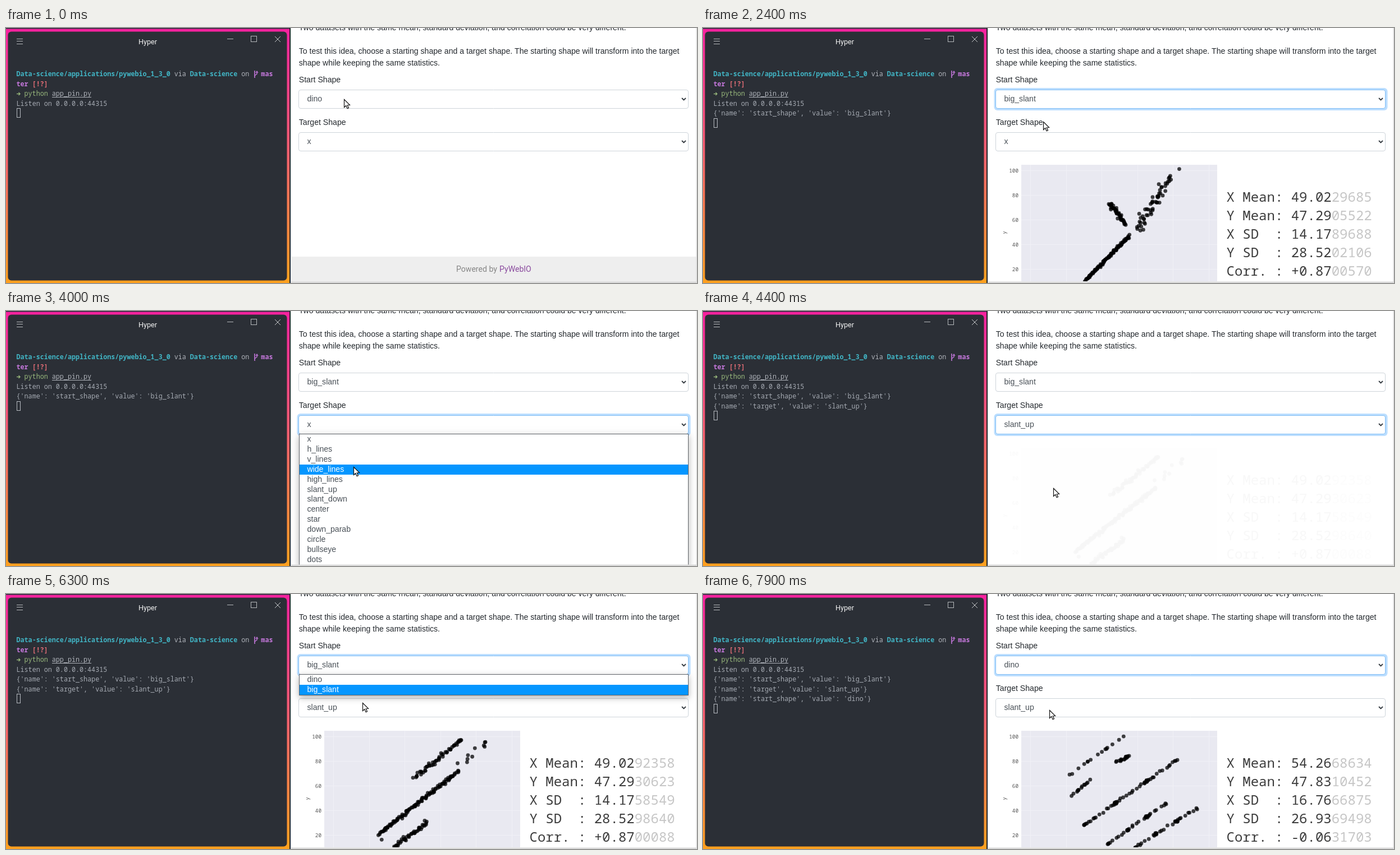
An HTML page with a canvas for the animation above (8 s loop, 1231 by 455 pixels).

```html
<!DOCTYPE html>
<html lang="en">
<head>
<meta charset="utf-8">
<title>Pin widgets demo</title>
<style>
html, body { margin: 0; width: 100%; height: 100%; overflow: hidden; background: #fff; }
canvas { display: block; width: 1231px; height: 455px; }
</style>
</head>
<body>
<canvas id="stage" width="1231" height="455"></canvas>
<script>
const W = 1231, H = 455, LOOP = 8000, STEP = 100, GLIDE = 250;
const ctx = document.getElementById('stage').getContext('2d');
const SANS = '14.08px "Liberation Sans", Arial, sans-serif';
const ROBOTO = 'Roboto, sans-serif';
const MONO = '"Noto Sans Mono", monospace';
const CELL = 7.03, ROW = 17.55;
const STARTS = ['dino', 'big_slant'];
const TARGETS = ['x', 'h_lines', 'v_lines', 'wide_lines', 'high_lines', 'slant_up',
  'slant_down', 'center', 'star', 'down_parab', 'circle', 'bullseye', 'dots'];

// Where the pointer comes to rest: arrival time, x, y
const STOPS = [
  [0, 602, 127], [200, 599, 128], [1100, 619, 179], [1500, 604, 163], [1900, 606, 167],
  [2800, 616, 183], [3300, 610, 207], [4100, 624, 316], [5100, 645, 260], [5300, 640, 172],
  [5700, 635, 125], [6300, 635, 194], [6700, 615, 150], [7900, 617, 207]
];

// Noisy streaks of dots: x1, y1, x2, y2, count, spread
const SLANT_TO_X = [
  [680, 452, 760, 370, 95, 2.4], [724, 311, 753, 350, 46, 3.4], [774, 362, 832, 262, 56, 9]
];
const SLANT_UP = [
  [663, 430, 806, 315, 112, 3.6], [690, 453, 752, 407, 42, 3.8],
  [728, 328, 812, 258, 52, 4], [812, 304, 858, 262, 10, 7]
];
const DINO_UP = [
  [653, 322, 747, 256, 15, 1], [658, 359, 690, 332, 13, 2], [736, 300, 760, 289, 15, 2.4],
  [680, 412, 838, 300, 60, 2.2], [722, 445, 822, 376, 36, 2.2], [770, 452, 877, 384, 36, 2.2]
];

// Each pick closes the list, logs a line and fades a new chart in
const PICKS = [
  { at: 1700, log: "{'name': 'start_shape', 'value': 'big_slant'}",
    chart: makeChart(SLANT_TO_X, 0, ['49.0229685', '47.2905522', '14.1789688', '28.5202106', '+0.8700570']) },
  { at: 4300, log: "{'name': 'target', 'value': 'slant_up'}",
    chart: makeChart(SLANT_UP, 0, ['49.0292358', '47.2930623', '14.1758549', '28.5298640', '+0.8700088']) },
  { at: 6900, log: "{'name': 'start_shape', 'value': 'dino'}",
    chart: makeChart(DINO_UP, 1, ['54.2668634', '47.8310452', '16.7666875', '26.9369498', '-0.0631703']) }
];

function text(g, str, x, y, color, font, align = 'left') {
  g.font = font;
  g.fillStyle = color;
  g.textAlign = align;
  g.fillText(str, x, Math.round(y));
}

function box(g, x, y, w, h, color) {
  g.fillStyle = color;
  g.fillRect(x, y, w, h);
}

function line(points, color, width = 1) {
  ctx.beginPath();
  points.forEach(([x, y]) => ctx.lineTo(x, y));
  ctx.strokeStyle = color;
  ctx.lineWidth = width;
  ctx.stroke();
}

function random(seed) {
  return () => {
    seed = (seed * 16807) % 2147483647;
    return seed / 2147483647;
  };
}

// Dots along each streak; clump gathers them in bunches, a few stray further off
function scatter(g, streaks, clump) {
  const rnd = random(40503);
  g.fillStyle = 'rgba(0,0,0,.74)';
  for (const [x1, y1, x2, y2, n, spread] of streaks) {
    for (let i = 0; i < n; i++) {
      let p = (i + rnd()) / n;
      p -= clump * Math.sin(18 * p) / 18;
      const reach = spread * (rnd() < .1 ? 3 - clump : 1);
      const stray = () => (rnd() + rnd() - 1) * reach;
      g.beginPath();
      g.arc(x1 + (x2 - x1) * p + stray(), y1 + (y2 - y1) * p + stray(), 3.4, 0, 7);
      g.fill();
    }
  }
}

function makeChart(streaks, clump, stats) {
  const layer = document.createElement('canvas');
  layer.width = W;
  layer.height = H;
  const g = layer.getContext('2d');
  box(g, 521, 235, 695, 217, '#fff');
  box(g, 567, 244, 349, 208, '#e9e9f1');
  for (let x = 583; x < 916; x += 63.5) box(g, Math.round(x), 244, 1, 208, '#f0f0f6');
  for (let i = 0; i < 5; i++) {
    const y = 255 + i * 44;
    box(g, 567, y - 1, 349, 1, '#f0f0f6');
    text(g, String(100 - i * 20), 562, y + 3, '#555', '9.3px ' + MONO, 'right');
  }
  g.save();
  g.translate(540, 365);
  g.rotate(-Math.PI / 2);
  text(g, 'y', 0, 0, '#555', '9px ' + MONO, 'center');
  g.restore();

  g.save();
  g.beginPath();
  g.rect(567, 244, 349, 208);
  g.clip();
  scatter(g, streaks, clump);
  g.restore();

  ['X Mean: ', 'Y Mean: ', 'X SD  : ', 'Y SD  : ', 'Corr. : '].forEach((label, i) => {
    const y = 310 + i * 33, font = '300 24px ' + MONO;
    text(g, label + stats[i].slice(0, 5), 932.5, y, '#3c3c3c', font);
    text(g, stats[i].slice(5), 932.5 + 13 * 14.4, y, '#c6c6c6', font);
  });
  return layer;
}

function pointer(t) {
  const next = STOPS.findIndex(s => s[0] > t);
  const i = next < 0 ? STOPS.length - 1 : next;
  const [t1, x1, y1] = STOPS[i], [t0, x0, y0] = STOPS[i - 1];
  const start = Math.max(t0, t1 - GLIDE);
  const p = Math.min(1, Math.max(0, (t - start) / (t1 - start)));
  const e = p * p * (3 - 2 * p);
  return [Math.round(x0 + (x1 - x0) * e), Math.round(y0 + (y1 - y0) * e)];
}

function drawPointer([x, y]) {
  ctx.save();
  ctx.translate(x + .5, y + .5);
  ctx.beginPath();
  [[0, 0], [0, 14], [3.2, 11], [5.6, 16.3], [8, 15.2], [5.7, 10.2], [10, 10]]
    .forEach(([a, b]) => ctx.lineTo(a, b));
  ctx.closePath();
  ctx.fillStyle = '#fff';
  ctx.fill();
  ctx.strokeStyle = '#111';
  ctx.lineWidth = 1.2;
  ctx.stroke();
  ctx.restore();
}

function drawTerminal(logs) {
  const sky = ctx.createLinearGradient(0, 0, 0, H);
  sky.addColorStop(0, '#f7219f');
  sky.addColorStop(.5, '#f7606c');
  sky.addColorStop(1, '#ffa01e');
  box(ctx, 0, 0, 505, H, sky);
  box(ctx, 0, 0, 505, 1.5, '#23313a');
  box(ctx, 505, 0, 2, H, '#23282d');
  ctx.beginPath();
  ctx.roundRect(3.5, 6.5, 497, 444, 6);
  ctx.fillStyle = '#2b2f36';
  ctx.fill();

  for (const y of [19.5, 23.5, 28.5]) line([[19, y], [30, y]], '#b5b8bb');
  line([[394, 19.5], [405, 19.5]], '#b5b8bb');
  ctx.strokeRect(436.5, 14.5, 10, 10);
  line([[479, 15], [489, 25]], '#c8cacc');
  line([[489, 15], [479, 25]], '#c8cacc');
  text(ctx, 'Hyper', 252.5, 29, '#f2f2f2', '12.7px ' + ROBOTO, 'center');

  const put = (str, col, row, color, bold = '') =>
    text(ctx, str, 18.5 + col * CELL, 86 + row * ROW, color, bold + ' 11.72px ' + MONO);
  const teal = '#41b4c4', grey = '#b0b4bb', purple = '#c678dd', green = '#98b87c';
  put('Data-science/applications/pywebio_1_3_0', 0, 0, teal, 'bold');
  put('via', 40, 0, grey);
  put('Data-science', 44, 0, teal, 'bold');
  put('on', 57, 0, grey);
  line([[443, 76], [443, 89]], purple, 1.6);
  line([[443, 85], [447, 82], [447, 78]], purple, 1.4);
  line([[445, 80], [447, 77], [449, 80]], purple, 1.2);
  put('mas', 62, 0, purple, 'bold');
  put('ter', 0, 1, purple, 'bold');
  put('[!?]', 4, 1, '#e06c75', 'bold');
  line([[19, 117.5], [25, 117.5]], green, 1.4);
  line([[22.5, 115], [25, 117.5], [22.5, 120]], green, 1.4);
  put('python', 2, 2, green);
  put('app_pin.py', 9, 2, grey);
  line([[82, 123.5], [152, 123.5]], grey);
  put('Listen on 0.0.0.0:44315', 0, 3, '#a5aab2');
  logs.forEach((log, i) => put(log, 0, 4 + i, '#a5aab2'));
  ctx.strokeStyle = '#b8bcc2';
  ctx.lineWidth = 1;
  ctx.strokeRect(19.5, Math.round(73 + (4 + logs.length) * ROW) + .5, 6, 16);
}

function drawSelect(y, value, focus) {
  if (focus > 0) {
    ctx.beginPath();
    ctx.roundRect(518.5, y - 3, 701, 40, 6);
    ctx.fillStyle = `rgba(30,145,255,${.3 * focus})`;
    ctx.fill();
  }
  ctx.beginPath();
  ctx.roundRect(521.5, y + .5, 694, 33, 3.5);
  ctx.fillStyle = '#fff';
  ctx.fill();
  ctx.lineWidth = 1;
  ctx.strokeStyle = focus > .5 ? '#80bdf5' : '#ced4da';
  ctx.stroke();
  text(ctx, value, 536.5, y + 21, '#495057', SANS);
  line([[1204, y + 15], [1207.5, y + 18.5], [1211, y + 15]], '#343a40', 1.8);
}

function drawPopup(top, height, fill) {
  ctx.save();
  ctx.shadowColor = 'rgba(0,0,0,.3)';
  ctx.shadowBlur = 12;
  ctx.shadowOffsetY = 4;
  box(ctx, 522, top, 694, height, fill);
  ctx.restore();
}

function drawList(top, options, value, [, py]) {
  const row = 17.9, height = Math.round(options.length * row) + 2;
  drawPopup(top, height, '#fff');
  ctx.strokeStyle = '#5f6368';
  ctx.lineWidth = 1;
  ctx.strokeRect(522.5, top + .5, 693, height - 1);
  const over = Math.floor((py - top) / row);
  const active = options[over] ? over : options.indexOf(value);
  options.forEach((name, i) => {
    const y = Math.round(top + 1 + i * row);
    if (i === active) box(ctx, 523, y, 692, 18, '#0596ff');
    text(ctx, name, 536.5, y + 13, i === active ? '#fff' : '#495057', SANS);
  });
}

function drawPage(t, done, mouse) {
  const within = (a, b) => t >= a && t < b;
  const ramp = a => Math.min(1, Math.max(0, (t - a + STEP) / 200));
  const say = (str, y) => text(ctx, str, 521.8, y, '#24292e', SANS);
  box(ctx, 507, 0, W - 507, H, '#fff');
  box(ctx, 507, 0, 1.5, H, '#e4e4e4');
  say('Two datasets with the same mean, standard deviation, and correlation could be very different.', 4);
  say('To test this idea, choose a starting shape and a target shape. The starting shape will transform into the target', 46);
  say('shape while keeping the same statistics.', 67);
  say('Start Shape', 97);
  say('Target Shape', 173);

  const start = within(1700, 6900) ? 'big_slant' : 'dino';
  const target = t < 4300 ? 'x' : 'slant_up';
  const toTarget = ramp(3800), back = ramp(5900);
  drawSelect(110, start, Math.max(ramp(1000) * (1 - toTarget), back));
  drawSelect(186, target, toTarget * (1 - back));

  if (done.length) {
    const { at, chart } = done[done.length - 1];
    const p = Math.min(1, (t - at - 30) / 600);
    ctx.globalAlpha = .5 - Math.cos(p * Math.PI) / 2;
    ctx.drawImage(chart, 0, 0);
    ctx.globalAlpha = 1;
  } else {
    box(ctx, 509, 408, 721, 45, '#eee');
    text(ctx, 'Powered by ', 802, 435, '#868686', '14.08px ' + ROBOTO);
    text(ctx, 'PyWebIO', 879, 435, '#8a4a9e', '14.08px ' + ROBOTO);
  }

  if (within(1000, 1700) || within(5900, 6900)) drawList(143, STARTS, start, mouse);
  if (within(3400, 3800)) drawPopup(219, 233, '#f0efee');
  if (within(3800, 4300)) drawList(219, TARGETS, target, mouse);
  box(ctx, 507, 452.5, W - 507, 3, '#d9d9d9');
  box(ctx, 1229.5, 0, 1.5, H, '#dcdcdc');
}

function draw(t) {
  const mouse = pointer(t);
  const done = PICKS.filter(p => t >= p.at + STEP);
  drawPage(t, done, mouse);
  drawTerminal(done.map(p => p.log));
  drawPointer(mouse);
}

const begin = performance.now();
function tick() {
  const t = (performance.now() - begin) % LOOP;
  draw(Math.floor(t / STEP) * STEP);
  requestAnimationFrame(tick);
}
tick();
</script>
</body>
</html>
```
